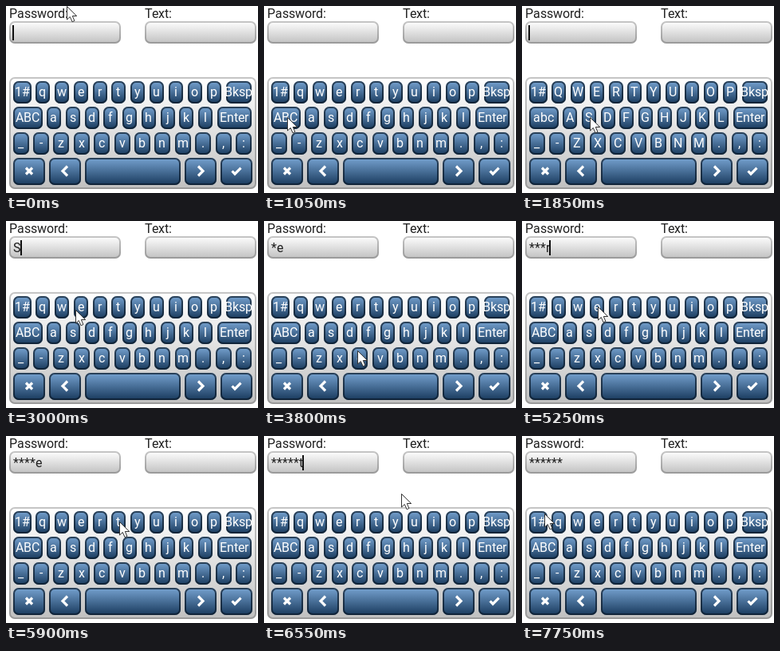
Write an HTML page with a canvas that moves like this. It is 316 by 234 pixels and loops after 8000 ms.

```html
<!DOCTYPE html>
<html lang="en">
<head>
<meta charset="utf-8">
<title>On-screen keyboard</title>
<style>
html, body { margin: 0; width: 100%; height: 100%; overflow: hidden; background: #fff; }
canvas { display: block; }
</style>
</head>
<body>
<canvas width="316" height="234"></canvas>
<script>
const ctx = document.querySelector('canvas').getContext('2d');
const LOOP = 8000, TICK = 50, BLINK = 450, PRESS = 100, LINGER = 100, MASK_DELAY = 1600;
const GAP = 5, MARGIN = 9, INNER_WIDTH = 300;
const INK = '#202020';

// Labels and relative widths of the first, middle and last keys
const ROWS = [
  ['1# q w e r t y u i o p Bksp', 5, 4, 7],
  ['ABC a s d f g h j k l Enter', 6, 3, 7],
  ['_ - z x c v b n m . , :', 1, 1, 1],
  ['close left space right ok', 2, 2, 2],
];

const KEYS = ROWS.flatMap(([labels, first, middle, last], row) => {
  const names = labels.split(' ');
  const sizes = names.map((name, i) =>
    name === 'space' ? 6 : i === 0 ? first : i === names.length - 1 ? last : middle);
  const total = sizes.reduce((a, b) => a + b);
  const unit = (INNER_WIDTH - GAP * (names.length - 1)) / total;
  let used = 0;
  return names.map((label, i) => {
    const x = MARGIN + i * GAP + Math.floor(used * unit);
    used += sizes[i];
    return { label, x, y: 94 + 32 * row, w: Math.floor(sizes[i] * unit), h: row === 3 ? 34 : 28 };
  });
});

// What the pointer goes to, when it arrives, when it clicks
const STOPS = [
  { aim: [76, 0], arrive: 0, click: 0 },
  { aim: 'ABC', arrive: 700, click: 1550 },
  { aim: 's', arrive: 1850, click: 2050 },
  { aim: 'ABC', arrive: 2450, click: 2550 },
  { aim: 'e', arrive: 3100, click: 3200 },
  { aim: 'c', arrive: 3950, click: 4050 },
  { aim: 'r', arrive: 4550, click: 4950 },
  { aim: 'e', arrive: 5250, click: 5450 },
  { aim: 't', arrive: 5900, click: 6150 },
  { aim: [172, 72], arrive: 6550 },
  { aim: [198, 34], arrive: 6900, click: 7100 },
  { aim: [28, 97], arrive: 7700 },
];
const SWITCH_FIELD = STOPS.at(-2).click;
const LAST_CHANGE = 7750;

const [shiftOn, shiftOff] = STOPS.filter(s => s.aim === 'ABC').map(s => s.click);
const isUpper = t => t >= shiftOn && t < shiftOff;
const TYPED = STOPS.filter(s => s.aim.length === 1).map(({ aim, click }) =>
  ({ time: click, char: isUpper(click) ? aim.toUpperCase() : aim }));

function tipAt({ aim }) {
  if (Array.isArray(aim)) return aim;
  const { x, y, w, h } = KEYS.find(key => key.label === aim);
  return [x + w / 2 + 1, y + h / 2 - 1];
}

function pointerAt(t) {
  const next = STOPS.findIndex(s => s.arrive > t);
  if (next < 0) return tipAt(STOPS.at(-1));
  const from = STOPS[next - 1], to = STOPS[next];
  const leave = from.click === undefined ? from.arrive : from.click + LINGER;
  const u = Math.max(0, (t - leave) / (to.arrive - leave));
  const eased = u * u * (3 - 2 * u);
  const end = tipAt(to);
  return tipAt(from).map((start, i) => Math.round(start + (end[i] - start) * eased));
}

function panel(x, y, w, h, top, bottom, border) {
  const fill = ctx.createLinearGradient(0, y, 0, y + h);
  fill.addColorStop(0, top);
  fill.addColorStop(1, bottom);
  ctx.fillStyle = fill;
  ctx.beginPath();
  ctx.roundRect(x, y, w, h, 7);
  ctx.fill();
  ctx.strokeStyle = border;
  ctx.lineWidth = 2;
  ctx.beginPath();
  ctx.roundRect(x + 1, y + 1, w - 2, h - 2, 6);
  ctx.stroke();
}

const silverPanel = (x, y, w, h) => panel(x, y, w, h, '#fff', '#c0c0c0', 'rgba(64,64,64,.3)');

// Whole-pixel advances with kerning, as on a small embedded display
const measure = text => ctx.measureText(text).width;
const advance = (c, next = '') => Math.round(measure(c + next) - measure(next));
const textWidth = text => [...text].reduce((sum, c, i) => sum + advance(c, text[i + 1]), 0);

function write(text, x, baseline, color) {
  ctx.fillStyle = color;
  [...text].forEach((c, i) => {
    ctx.fillText(c, x, baseline);
    x += advance(c, text[i + 1]);
  });
}

function polyline(x, y, ...points) {
  ctx.beginPath();
  for (const [dx, dy] of points) ctx.lineTo(x + dx, y + dy);
}

function stroke(x, y, ...points) {
  polyline(x, y, ...points);
  ctx.strokeStyle = '#fff';
  ctx.lineWidth = 3.2;
  ctx.stroke();
}

const chevron = side => (x, y) => stroke(x, y, [-3 * side, -6], [3 * side, 0], [-3 * side, 6]);
const ICONS = {
  close(x, y) {
    stroke(x, y, [-4, -4], [4, 4]);
    stroke(x, y, [4, -4], [-4, 4]);
  },
  left: chevron(-1),
  right: chevron(1),
  ok: (x, y) => stroke(x, y, [-5.5, 0], [-2, 3.7], [5.5, -3.8]),
  space() {},
};

function drawKey({ label, x, y, w, h }, upper, pressed) {
  const [top, bottom] = pressed ? ['#336290', '#10263c'] : ['#76a2d0', '#193a5d'];
  panel(x, y, w, h, top, bottom, 'rgba(11,25,40,.7)');
  const cx = x + w / 2, cy = y + h / 2;
  if (ICONS[label]) return ICONS[label](cx, cy - 0.5);
  let text = label;
  if (upper && label === 'ABC') text = 'abc';
  else if (upper && label.length === 1) text = label.toUpperCase();
  ctx.save();
  ctx.beginPath();
  ctx.rect(x, y, w, h);
  ctx.clip();
  write(text, Math.floor(cx - textWidth(text) / 2), cy + 5, '#fff');
  ctx.restore();
}

function drawCaret(x) {
  ctx.fillStyle = '#101010';
  ctx.fillRect(x, 24, 2, 19);
}

function drawPointer(x, y) {
  polyline(x + 0.5, y + 0.5, [0, 0], [0, 16.5], [3.8, 13], [6.6, 19.3], [9.4, 18], [6.8, 12], [12.2, 12]);
  ctx.closePath();
  ctx.fillStyle = '#fff';
  ctx.fill();
  ctx.strokeStyle = '#333';
  ctx.lineWidth = 1;
  ctx.stroke();
}

const blinkOn = (t, since) => Math.floor((t - since) / BLINK) % 2 === 0;

function draw(t) {
  ctx.fillStyle = '#fff';
  ctx.fillRect(0, 0, 316, 234);
  ctx.font = '16px Roboto, sans-serif';
  write('Password:', 4, 15, INK);
  write('Text:', 174, 15, INK);
  silverPanel(4, 19, 140, 28);
  silverPanel(174, 19, 140, 28);

  const firstBlink = -300;
  const typed = TYPED.filter(({ time }) => time <= t);
  const last = typed.at(-1) || { time: firstBlink, char: '' };
  const masked = t - last.time >= MASK_DELAY;
  const text = typed.length ? '*'.repeat(typed.length - 1) + (masked ? '*' : last.char) : '';
  write(text, 9, 39, INK);
  if (t >= SWITCH_FIELD) {
    if (blinkOn(t, firstBlink)) drawCaret(178);
  } else if (blinkOn(t, last.time)) {
    drawCaret(8 + textWidth(text));
  }

  silverPanel(4, 89, 310, 140);
  const press = STOPS.find(({ click }) => t >= click - PRESS && t < click);
  for (const key of KEYS) drawKey(key, isUpper(t), press && press.aim === key.label);
  drawPointer(...pointerAt(t));
}

const start = performance.now();
function frame() {
  const t = Math.floor((performance.now() - start) % LOOP / TICK) * TICK;
  draw(Math.min(t, LAST_CHANGE));
  requestAnimationFrame(frame);
}
frame();
</script>
</body>
</html>
```
